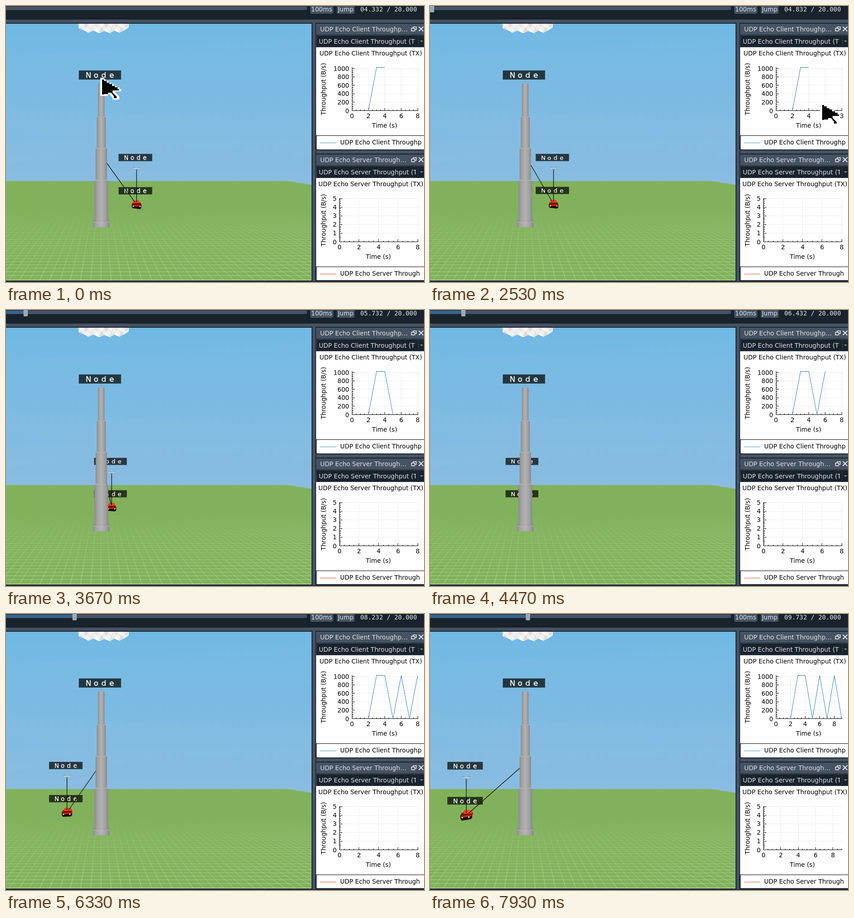
An HTML page for the animation above (8 s loop, 922 px wide and 608 px high).

```html
<!DOCTYPE html>
<html lang="en">
<head>
<meta charset="utf-8">
<title>Network replay</title>
<style>
html, body { margin: 0; width: 100%; height: 100%; overflow: hidden; background: #19232d; }
svg { display: block; width: 922px; height: 608px; }
text { font: 13.65px "DejaVu Sans", sans-serif; white-space: pre; }
.ui { fill: #e0e1e3; }
.mono { font: 13.85px "DejaVu Sans Mono", monospace; }
.tag { font-size: 13.2px; fill: #fff; stroke: #fff; stroke-width: .25; }
.end { text-anchor: end; }
.mid { text-anchor: middle; }
.axis { fill: none; stroke: #000; shape-rendering: crispEdges; }
.grid { fill: none; stroke: #c8c8c8; stroke-dasharray: 1 2; shape-rendering: crispEdges; }
.curve { fill: none; stroke: #3a8fc4; stroke-width: 1.1; stroke-linejoin: bevel; }
</style>
</head>
<body>
<svg viewBox="0 0 922 608" xmlns="http://www.w3.org/2000/svg">
  <defs>
    <linearGradient id="sky" x2="0" y2="1">
      <stop stop-color="#70b9e4"/><stop offset="1" stop-color="#8abce0"/>
    </linearGradient>
    <linearGradient id="steel">
      <stop stop-color="#8c8c8c"/><stop offset=".2" stop-color="#a2a2a2"/>
      <stop offset=".5" stop-color="#b2b2b2"/><stop offset=".8" stop-color="#a0a0a0"/>
      <stop offset="1" stop-color="#888"/>
    </linearGradient>
    <linearGradient id="fade" x2="0" y2="1">
      <stop stop-color="#000"/><stop offset=".3" stop-color="#666"/><stop offset="1" stop-color="#fff"/>
    </linearGradient>
    <mask id="near" maskUnits="userSpaceOnUse" x="0" y="450" width="674" height="155">
      <rect y="450" width="674" height="155" fill="url(#fade)"/>
    </mask>
    <clipPath id="view"><rect y="39" width="674" height="566"/></clipPath>
    <clipPath id="combo"><rect x="685" width="219" height="608"/></clipPath>
    <clipPath id="legend"><rect x="685" width="232" height="608"/></clipPath>
    <g id="tag">
      <rect x="-37" y="-8" width="74" height="16" opacity=".7"/>
      <text class="tag" x="-25 -10.9 2.7 16.6" y="5">Node</text>
    </g>
  </defs>

  <rect width="922" height="608" fill="#19232d"/>
  <rect x="-20" y="1" width="684" height="8" rx="3" fill="#455364"/>
  <rect id="played" x="-20" y="2" height="6" fill="#346792"/>
  <rect id="knob" y="-6" width="9.5" height="20" rx="2" fill="#9da9b5"/>
  <rect x="671" y="-8" width="51" height="25" rx="4" fill="#455364"/>
  <rect x="730" y="-8" width="39" height="25" rx="4" fill="#455364"/>
  <text class="ui" x="673" y="11.5">100ms</text>
  <text class="ui" x="732" y="11.5">Jump</text>
  <text class="ui mono" id="clock" x="781.5" y="12"></text>
  <rect y="30" width="922" height="7" fill="#455364"/>
  <rect x="676" y="30" width="6.5" height="576" fill="#455364"/>
  <rect y="606.5" width="922" height="1.5" fill="#2b3745"/>

  <g clip-path="url(#view)">
    <rect y="39" width="674" height="360" fill="url(#sky)"/>
    <g fill="#fff" opacity=".015">
      <path d="M0 110L674 72V150L0 172Z"/><path d="M0 222L674 262V330L0 280Z"/><path d="M0 300L674 240V300L0 345Z"/>
    </g>
    <path d="M0 385.7H622L674 393.7V605H0Z" fill="#81b25b"/>
    <path id="mesh" mask="url(#near)" fill="none" stroke="#d8ebc5" stroke-opacity=".55"/>
    <g id="cloud"></g>
    <g id="topTag"><use href="#tag"/></g>
    <g id="lowTag"><use href="#tag"/></g>
    <g id="car"></g>
    <path id="links" fill="none" stroke="#0a0d08" stroke-width="1.3"/>
    <g id="drone">
      <path d="M-7 -2L-2 0M7 -2L2 0" stroke="#dfe7ea" stroke-width="1.6"/>
      <path d="M-8 -2.5H-3" stroke="#4d93b0" stroke-width="1.3"/>
      <path d="M3 -2.5H8" stroke="#7d8d94" stroke-width="1.3"/>
      <path d="M-4 -1H4L2 3H-2Z" fill="#c3cccf"/><path d="M-2.5 2H2.5" stroke="#48565c"/>
    </g>
    <g id="tower" fill="url(#steel)"></g>
    <use href="#tag" transform="translate(207.2 152) scale(1.26)"/>
  </g>
  <g id="panels"></g>
  <g id="cursor" shape-rendering="crispEdges">
    <path d="M0 0H6L12 4V7H18V11H24V14H30V18H36V21H42V25H46V30H33V33L42 42V48H27V44L21 37H16V40H0Z" fill="#fff"/>
    <path d="M4 4H8V7H14V11H20V14H26V18H32V21H38V25H41V28H27V33L36 42V45H30V41L24 33H17V36H8V37H4Z"/>
  </g>
</svg>
<script>
const $ = id => document.getElementById(id);
const put = (id, attrs) => { for (const a in attrs) $(id).setAttribute(a, attrs[a]); };

// Piecewise linear curve through [x, y] points.
function along(pts, x) {
  let i = 1;
  while (i < pts.length - 1 && x > pts[i][0]) i++;
  const [a, b] = pts[i - 1], [c, d] = pts[i];
  return b + (d - b) * Math.min(1, Math.max(0, (x - a) / (c - a)));
}

const TICKS = [[31, 2], [43, 8], [55, 14], [78, 28], [95, 39], [119, 54]];
const CAR_X = [[0, 288], [2, 284], [8, 261], [14, 233], [28, 178], [39, 134.5], [54, 80]];
const CAR_Y = [[0, 437.3], [2, 437], [8, 435.5], [14, 434.2], [28, 434.2], [39, 437], [54, 443.5]];
const YAW = [[0, -.3], [14, 0], [28, .15], [54, 1]];
const LOAD = [[2, 0], [3, 1024], [4, 1024], [5, 0], [6, 1024], [7, 0], [8, 1024], [9, 0]];

function buildScene() {
  // Ground grid seen by a level camera: focal length 683, eye 12.5 cells up.
  const hx = 209.5, hy = 322, eye = 12.5, focal = 683;
  let d = '';
  for (let z = 30.4; z < 66; z++) d += `M0 ${(hy + focal * eye / z).toFixed(1)}H674`;
  for (let i = -26; i < 50; i++) {
    const at = y => (hx + i * (y - hy) / eye).toFixed(1);
    d += `M${at(450)} 450L${at(605)} 605`;
  }
  put('mesh', { d });

  const low = [[160, 49], [171, 53], [182, 59], [193, 54], [206, 60], [217, 55], [229, 60], [239, 54], [250, 59], [260, 54], [271, 47]];
  let cloud = `<path fill="#efefef" d="M160 39H271V47L${low.slice().reverse().join('L')}Z"/>`;
  const tones = ['#fff', '#dadada', '#f5f5f5', '#e4e4e4'];
  for (let i = 0; i < 10; i++) {
    const x = 160 + i * 11.1, y = 46 + i % 2 * 2;
    cloud += `<path fill="${tones[i % 4]}" d="M${x} 39h11l-5.5 ${y - 39}Z"/>
      <path fill="${tones[(i + 1) % 4]}" d="M${low[i]}L${low[i + 1]}L${x + 5.5} ${y}Z"/>`;
  }
  $('cloud').innerHTML = cloud;

  const part = (x, y, w, h, r) =>
    `<path d="M${x} ${y + r}Q${x + w / 2} ${y - r} ${x + w} ${y + r}V${y + h - r}Q${x + w / 2} ${y + h + r} ${x} ${y + h - r}Z"/>`;
  const rim = (x, y, w) => `<path d="M${x} ${y}Q${x + w / 2} ${y - 3} ${x + w} ${y}" fill="none" stroke="#c0c0c0" stroke-width=".8"/>`;
  $('tower').innerHTML = part(194.8, 383, 30.8, 96, 2) + rim(194.8, 384.5, 30.8) +
    part(191.5, 474, 37, 12.5, -2) + `<path d="M191.5 476Q210 480 228.5 476" fill="none" stroke="#c0c0c0" stroke-width=".8"/>` +
    `<path d="M191.5 484.5Q210 488.5 228.5 484.5V482Q210 486 191.5 482Z"/>` +
    part(197.7, 312.5, 25, 71, 1) + rim(197.7, 314, 25) +
    part(200.2, 243.5, 20, 69.5, 1) + rim(200.2, 245, 20) +
    part(202.8, 170, 14.6, 74, 1);
}

const CHARTS = [
  { name: 'Client', y: 39, x0: 763, top: 135.4, base: 230.5, max: 1024, step: 200, sub: 50, color: '#3a8fc4', cut: 'Throughp', bottom: 316, rule: 285.5 },
  { name: 'Server', y: 327, x0: 735.5, top: 424, base: 519.5, max: 5, step: 1, sub: .2, color: '#f9512c', cut: 'Through', bottom: 604, rule: 574.5 }
];

function dock(c, i) {
  const { y } = c, name = `UDP Echo ${c.name} `;
  return `<rect x="684" y="${y}" width="238" height="24" fill="#455364"/>
    <text class="ui" x="693" y="${y + 17}">${name}${c.cut}…</text>
    <g fill="none" stroke="#e0e1e3" stroke-width="1.7">
      <path d="M898 ${y + 10}V${y + 7}H905V${y + 13}H902"/><rect x="894.5" y="${y + 10}" width="7" height="6"/>
      <path d="M910.5 ${y + 6.5}l10 10m0 -10l-10 10" stroke-width="2.1"/>
    </g>
    <rect x="684.5" y="${y + 25.5}" width="250" height="26" fill="#19232d" stroke="#455364"/>
    <text class="ui" x="690" y="${y + 43.5}" clip-path="url(#combo)">${name}Throughput (T</text>
    <path d="M909.5 ${y + 26}v25" stroke="#2c3a49"/>
    <path d="M913 ${y + 37}h7l-3.5 4Z" fill="#788492"/>
    <rect x="684" y="${y + 52}" width="238" height="${c.bottom - y - 52}" fill="#fff"/>
    <text class="mid" x="804.7" y="${y + 70}">${name}Throughput (TX)</text>
    <text class="mid" transform="translate(705 ${(c.top + c.base) / 2}) rotate(-90)">Throughput (B/s)</text>
    <text class="mid" x="${(c.x0 + 908) / 2 - .5}" y="${c.base + 37}">Time (s)</text>
    <g id="plot${i}"></g>
    <path class="axis" d="M922 ${c.rule}H684.5V${c.bottom}"/>
    <path d="M692 ${c.rule + 16}h37" stroke="${c.color}" stroke-width="1.1"/>
    <text x="737" y="${c.rule + 19.5}" clip-path="url(#legend)">${name}${c.cut}</text>`;
}

function drawPlot(c, i, span, done) {
  const px = v => c.x0 + v * (908 - c.x0) / span;
  const py = v => c.base - v * (c.base - c.top) / c.max;
  let axis = `M${c.x0} ${c.top}V${c.base}H908`, grid = '', labels = '';
  for (let v = 0; v <= span; v += .5) {
    const major = v % 2 === 0;
    axis += `M${px(v)} ${c.base}v${major ? -6 : -3}`;
    if (!major) continue;
    if (v) grid += `M${px(v)} ${c.base}V${c.top}`;
    labels += `<text class="mid" x="${px(v)}" y="${c.base + 16.5}">${v}</text>`;
  }
  for (let n = 0; n * c.sub <= c.max + .001; n++) {
    const v = n * c.sub, major = n % Math.round(c.step / c.sub) === 0;
    axis += `M${c.x0} ${py(v)}h${major ? 6 : 3}`;
    if (!major) continue;
    if (n) grid += `M${c.x0} ${py(v)}H908`;
    labels += `<text class="end" x="${c.x0 - 6}" y="${py(v) + 5}">${Math.round(v)}</text>`;
  }
  const pts = LOAD.filter(p => p[0] <= done).map(([t, v]) => px(t) + ' ' + py(v));
  const curve = i ? '' : `<path class="curve" d="M${pts.join('L')}"/>`;
  $('plot' + i).innerHTML = `<path class="grid" d="${grid}"/><path class="axis" d="${axis}"/>${curve}${labels}`;
}

function carShape(yaw) {
  const r = yaw * 3.5, t = yaw * 2.5;
  return `<path d="M-10.5 0L-8 -4L8 -4L10.5 0V${7 - t}L8 ${9.5 - t}L-8 ${8.5 + t * .4}L-10.5 6Z" fill="#160a08"/>
    <path d="M${-6 + r} -9H${6 + r}L${9 + r} -3L10 ${4 - t}L-9.5 ${4 + t * .4}L-9 -1Z" fill="#a81506"/>
    <path d="M${-6 + r} -9H${6 + r}L${8 + r * .8} -3.5L${-7.5 + r * .6} -2.5Z" fill="#fb4710"/>
    <path d="M${-7.5 + r * .5} -2.5L${7.5 + r * .5} -3L8.5 ${.5 - t * .6}L-8.5 .5Z" fill="#67150b"/>
    <path d="M-9 1.5L9 ${1.5 - t}V${4 - t}L-9 4.5Z" fill="#c4200a"/>
    <path d="M-8.5 3h2.6v2.2h-2.6ZM${5.8 - t} ${3 - t * .4}h2.6v2.2h-2.6Z" fill="#fff1e6"/>`;
}

function cursorAt(f) {
  if (f < 3) return [208 - 83 * f, 158 - 54.5 * f];
  if (f < 34 || f > 43) return null;
  const u = (f - 33) / 10, v = 1 - u;
  return [100 * v * v + 3218 * u * v + 126 * u * u, 596 * u * u + 300 * u * v - 40 * v * v];
}

let lastPlot = -1;
function draw(ms) {
  const f = Math.floor(ms * .015 + .06);
  const k = f < 31 ? 0 : Math.floor(along(TICKS, f) + 1e-6);
  const now = 4.332 + k / 10;
  $('clock').textContent = now.toFixed(3).padStart(6, '0') + ' / 20.000';

  const knob = 17.5 + 4.315 * (k - 8);
  put('knob', { x: knob - 4.75 });
  put('played', { width: Math.max(0, knob + 20) });

  const x = along(CAR_X, k), y = along(CAR_Y, k), yaw = along(YAW, k), drop = y - 434;
  const size = (72 + drop * .65) / 74;
  const droneY = 358 + Math.max(0, (y - 437) * .46);
  const place = (px, py, s) => ({ transform: `translate(${px} ${py}) scale(${s})` });
  put('topTag', place(x - 2.6, 333.5 + drop * .08, size));
  put('lowTag', place(x - 2.6, 404.7 + drop * .7, size));
  put('drone', place(x, droneY, size));
  put('car', place(x, y, size * (1 + .16 * Math.max(0, yaw))));
  $('car').innerHTML = carShape(yaw);
  // Both links aim at the car's centre and stop at its roof.
  const part = (y - 5 - 329) / (y - 329);
  put('links', { d: `M${x} ${droneY + 2}V${y - 5}M210 329L${210 + (x - 210) * part} ${y - 5}` });

  const done = Math.floor(now);
  if (done !== lastPlot) {
    lastPlot = done;
    CHARTS.forEach((c, i) => drawPlot(c, i, Math.max(8, done), done));
  }

  const tip = cursorAt(f);
  put('cursor', tip ? { display: 'inline', transform: `translate(${tip})` } : { display: 'none' });
}

buildScene();
$('panels').innerHTML = CHARTS.map(dock).join('') +
  '<rect x="684" y="318" width="238" height="7" fill="#455364"/>';

const start = performance.now();
function loop() {
  draw((performance.now() - start) % 8000);
  requestAnimationFrame(loop);
}
draw(0);
requestAnimationFrame(loop);
</script>
</body>
</html>
```
